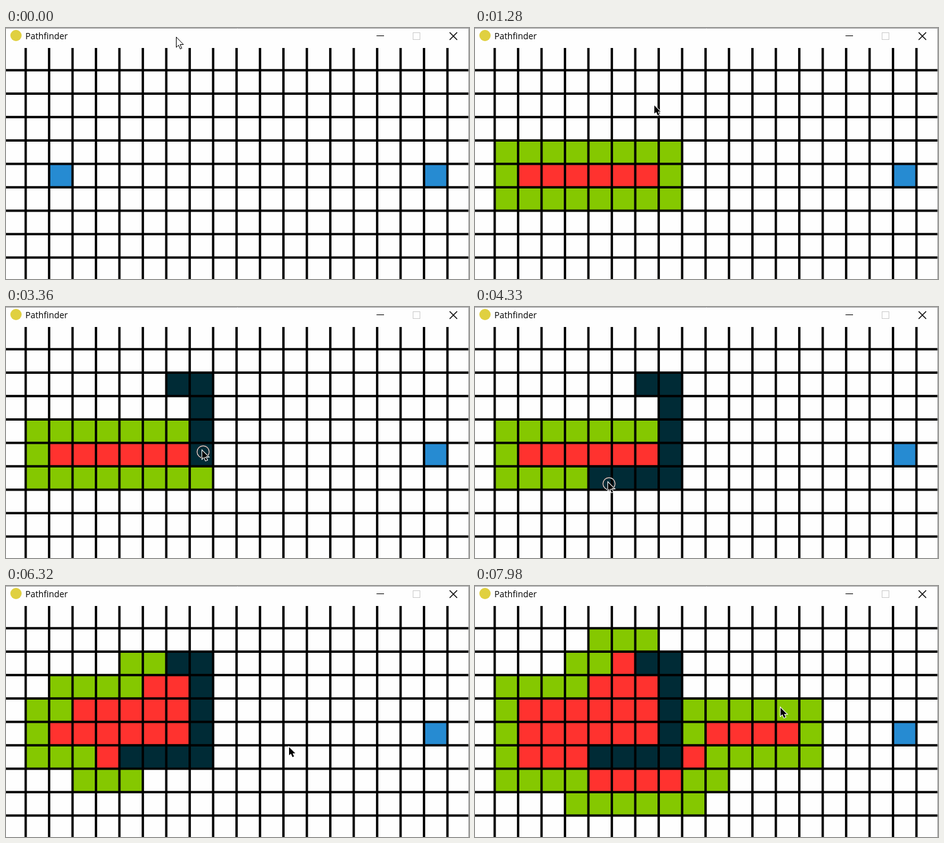
Animation, 741 px wide and 402 px high, one loop 8 s. Source, as an HTML page with a canvas:

```html
<!DOCTYPE html>
<html lang="en">
<head>
<meta charset="utf-8">
<title>Pathfinder</title>
<style>
  html, body { margin: 0; width: 100%; height: 100%; overflow: hidden; background: #fefefe; }
  canvas { display: block; }
</style>
</head>
<body>
<canvas id="stage" width="741" height="402"></canvas>
<script>
const ctx = document.getElementById('stage').getContext('2d');
const WIDTH = 741, HEIGHT = 402, LOOP = 8000;
const PITCH = 37.5, COLS = 20, ROWS = 10, LEFT = -6, TOP = 30, BAR = 32;
const BLUE = '#268bd2', GREEN = '#85c800', RED = '#ff322f', WALL = '#002b36', PAPER = '#fefefe';
const PRESS = 2460, RELEASE = 4760;

// Pointer glides: start, end, destination
const glides = [
  [400, 520, 287, 124],
  [2440, 2460, 289, 123],
  [2480, 2750, 314, 124],
  [2750, 3250, 315, 216],
  [3270, 3680, 312, 277],
  [3890, 4330, 213, 281],
  [4720, 4830, 310, 293],
  [4830, 4950, 453, 258],
  [7790, 7980, 489, 195]
];

function pointerAt(t) {
  let x = 272, y = 14;
  for (const [from, to, toX, toY] of glides) {
    const k = Math.min(1, Math.max(0, (t - from) / (to - from)));
    x += (toX - x) * k;
    y += (toY - y) * k;
  }
  return [Math.round(x), Math.round(y)];
}

const events = [];

// Visits the cells along each polyline, at an even pace from one time to the other.
function search(from, to, ...trails) {
  const cells = trails.flatMap(([start, ...stops]) => {
    let [col, row] = start;
    const trail = [start];
    for (const [toCol, toRow] of stops) {
      while (col !== toCol || row !== toRow) {
        col += Math.sign(toCol - col);
        row += Math.sign(toRow - row);
        trail.push([col, row]);
      }
    }
    return trail;
  });
  cells.forEach(([col, row], i) =>
    events.push({ time: from + (to - from) * i / (cells.length - 1), col, row }));
}

search(920, 1280, [[2, 5], [7, 5]]);

// The held pointer paints walls.
for (let time = PRESS + 30; time < RELEASE; time += 10) {
  const [x, y] = pointerAt(time);
  const col = Math.floor((x - LEFT) / PITCH), row = Math.floor((y - TOP) / PITCH);
  events.push({ time, col, row, wall: true });
}

search(5510, 6230, [[7, 4], [7, 3]], [[6, 4]], [[7, 5], [2, 5]], [[5, 4], [4, 4]], [[6, 3]], [[4, 6]]);
search(6320, 7090, [[3, 4], [2, 4]], [[3, 6], [2, 6]], [[5, 3], [6, 2]], [[5, 7], [8, 7], [10, 5], [11, 5]]);
search(7150, 7240, [[12, 5], [13, 5]]);

const key = (col, row) => row * COLS + col;

function cellsAt(t) {
  const cells = new Map([[key(2, 5), BLUE], [key(18, 5), BLUE]]);
  for (const { time, col, row, wall } of events) {
    if (time > t) break;
    const cell = key(col, row);
    // Going back over the closed row reopens the cell to the left.
    if (!wall && row === 5 && cells.get(cell - 1) === RED && time > RELEASE) cells.set(cell - 1, GREEN);
    cells.set(cell, wall ? WALL : RED);
    if (wall) continue;
    for (let dy = -1; dy <= 1; dy++) {
      for (let dx = -1; dx <= 1; dx++) {
        const near = key(col + dx, row + dy);
        if (!cells.has(near)) cells.set(near, GREEN);
      }
    }
  }
  // The open end of the trail is closed once the search has moved past the walls.
  for (let col = 10; col <= 13; col++) {
    const passed = events.some(e => e.col === col && e.row === 5 && e.time <= t);
    if (passed) cells.set(key(col, 5), RED);
  }
  return cells;
}

function line(x0, y0, x1, y1, color, width) {
  ctx.strokeStyle = color;
  ctx.lineWidth = width;
  ctx.beginPath();
  ctx.moveTo(x0, y0);
  ctx.lineTo(x1, y1);
  ctx.stroke();
}

function drawGrid(t) {
  for (const [cell, color] of cellsAt(t)) {
    ctx.fillStyle = color;
    ctx.fillRect(LEFT + (cell % COLS) * PITCH, TOP + Math.floor(cell / COLS) * PITCH, PITCH, PITCH);
  }
  for (let c = 1; c < COLS; c++) line(LEFT + c * PITCH, BAR, LEFT + c * PITCH, HEIGHT, '#000', 3.75);
  for (let r = 1; r < ROWS; r++) line(0, TOP + r * PITCH, WIDTH - 1, TOP + r * PITCH, '#000', 3.75);
}

function drawTitleBar() {
  ctx.fillStyle = PAPER;
  ctx.fillRect(0, 0, WIDTH, BAR);
  ctx.fillStyle = '#e0d040';
  ctx.beginPath();
  ctx.arc(16, 12, 9, 0, 7);
  ctx.fill();
  ctx.fillStyle = '#000';
  ctx.font = '13.8px "Open Sans", "Noto Sans", sans-serif';
  ctx.fillText('Pathfinder', 31, 18);
  line(593, 12.5, 605, 12.5, '#000', 1);
  ctx.strokeStyle = '#ccc';
  ctx.strokeRect(651.5, 7.5, 11, 11);
  line(710, 7, 722, 19, '#000', 1.4);
  line(722, 7, 710, 19, '#000', 1.4);
  line(0, 0.5, WIDTH, 0.5, '#a0a0a0', 1);
  line(WIDTH - 0.5, 0, WIDTH - 0.5, HEIGHT, '#a0a0a0', 1);
}

const systemArrow = new Path2D('M.5 .5v16.5l3.7-3.5 2.6 6 2.5-1-2.6-6h5.3z');
const gameArrow = new Path2D('M0 0v13l3-2.5 2.5 5.5 2.5-1-2.3-5h4.3z');

function drawPointer(t) {
  const [x, y] = pointerAt(t);
  const overBar = y < BAR;
  const arrow = overBar ? systemArrow : gameArrow;
  ctx.save();
  ctx.translate(x, y);
  ctx.strokeStyle = overBar ? '#000' : '#fff';
  ctx.fillStyle = overBar ? '#fff' : '#000';
  ctx.lineWidth = overBar ? 1 : 2;
  if (overBar) ctx.fill(arrow);
  ctx.stroke(arrow);
  if (!overBar) ctx.fill(arrow);
  if (t >= PRESS && t < RELEASE) {
    // The press ring inverts whatever lies under it.
    ctx.globalCompositeOperation = 'difference';
    ctx.lineWidth = 1.2;
    ctx.beginPath();
    ctx.arc(1.5, 2, 9.7, 0, 7);
    ctx.stroke();
  }
  ctx.restore();
}

function frame() {
  const t = performance.now() % LOOP;
  ctx.fillStyle = PAPER;
  ctx.fillRect(0, 0, WIDTH, HEIGHT);
  drawGrid(t);
  drawTitleBar();
  drawPointer(t);
  requestAnimationFrame(frame);
}
frame();
</script>
</body>
</html>
```
